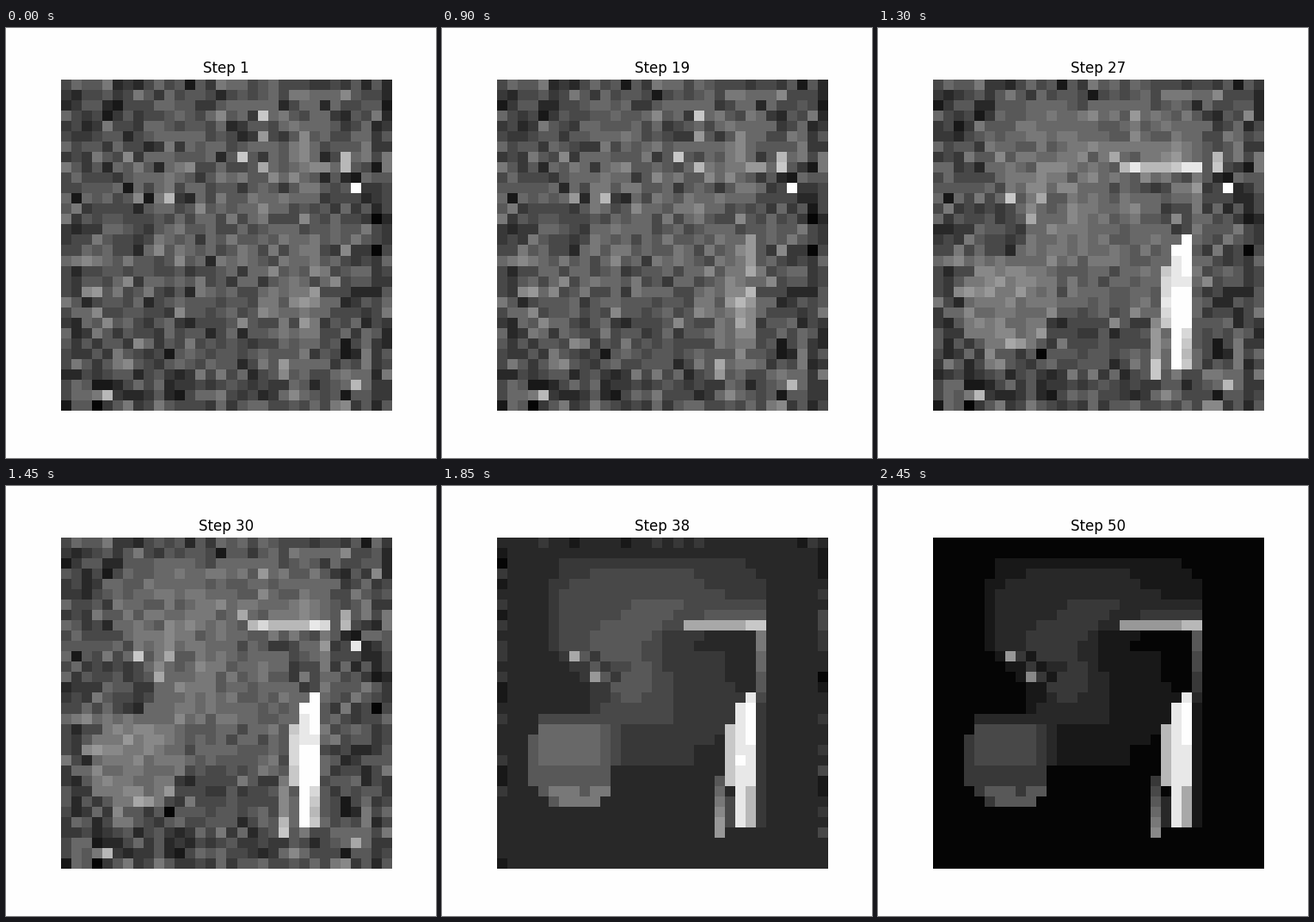
Animation of 500x500 px, one loop 2.5 s. Source, as a matplotlib script:

```python
import numpy as np
import matplotlib.pyplot as plt
from matplotlib.animation import FuncAnimation
from matplotlib.path import Path

SIZE = 32
STEPS = 50
SPARKS = [(17, 7), (27, 7), (27, 8), (28, 29), (4, 30), (10, 11), (19, 3)]

col, row = np.meshgrid(np.arange(SIZE), np.arange(SIZE))
centres = np.column_stack([col.ravel() + 0.5, row.ravel() + 0.5])


def blob(cx, cy, rx, ry):
    return np.exp(-((col - cx) / rx) ** 2 - ((row - cy) / ry) ** 2)


def ramp(step, start, end):
    """Smooth rise from 0 to 1 between two steps."""
    u = np.clip((step - start) / (end - start), 0, 1)
    return u * u * (3 - 2 * u)


def tone(level):
    """Grey value of one of 16 brightness levels."""
    return np.where(level == 0, 5, np.where(level == 15, 254, level * 16 + 8))


def draw_object():
    levels = np.zeros((SIZE, SIZE), int)

    def poly(level, *points):
        inside = Path(points).contains_points(centres).reshape(SIZE, SIZE)
        levels[inside] = level

    def box(level, x, y, w=1, h=1):
        levels[y:y + h, x:x + w] = level

    # Cloth, from the widest shade to the brightest fold
    poly(1, (6, 2), (23, 2), (26, 4), (26, 9), (22, 9), (22, 14), (24, 15),
         (22, 19), (19, 20), (19, 22), (12, 22), (9, 16), (9, 14), (5, 10), (5, 7))
    poly(2, (10, 3), (18, 3), (22, 5.5), (26, 6), (26, 7), (16, 9), (17, 18),
         (9, 18), (12, 14), (6, 11), (6, 5))
    poly(3, (14, 6), (18, 6), (18, 7), (14, 10), (15, 14), (13, 16), (11, 14),
         (14, 13), (9, 11), (9, 9.5))
    box(3, 20, 7, 6)
    poly(0, (21, 9), (24, 9), (24, 14), (22, 14), (22, 11), (19, 11), (19, 10))
    for i in range(3):
        box(3, 8 + i, 11 + i)
        box(1, 9 + i, 11 + i)
    box(9, 7, 11)
    box(8, 9, 13)

    # Bag
    box(2, 4, 17, 8, 5)
    poly(3, (4, 18), (11, 18), (11, 24), (10, 26), (5, 26), (3, 23), (3, 20))
    box(4, 4, 18, 6, 4)
    poly(5, (4, 24), (7, 24), (9, 25), (9, 24), (11, 24), (10, 26), (7, 26))

    # Handle and strap
    box(9, 18, 8, 6)
    box(11, 24, 8, 2)
    for y in range(9, 16):
        box(5 - (y - 9) // 2, 25, y)

    # Leg
    box(1, 25, 16, 1, 12)
    poly(11, (23, 17), (22, 19), (22, 24), (23, 24))
    poly(14, (24, 15), (25, 15), (25, 24), (24, 28), (23, 28), (23, 17))
    box(15, 24, 16, 1, 4)
    box(10, 24, 24, 1, 4)
    box(2, 22, 25, 1, 3)
    for y in range(23, 29):
        box(y - 20, 21, y)
    return np.where(levels > 0, tone(levels), 0)


def make_noise():
    rng = np.random.default_rng(12)
    noise, drift = np.clip(rng.normal(size=(2, SIZE, SIZE)), -3.2, 2.5)
    for c, r in SPARKS:
        noise[r, c] = 4.5
    noise[10, 28] = 9
    return noise, drift * 0.5


shape = draw_object()
noise, drift = make_noise()
centre = blob(15, 15, 12, 12)
glow = (14 * centre + 22 * blob(23, 20, 4, 6) + 18 * blob(21, 6, 5, 5)
        - 14 * (col > 29))
edge = np.where((col == 0) | (col == SIZE - 1), 1.0, 0.45 * (row == 0))


def mean_field(step):
    base = 74 - 68 * ramp(step, 33, 43)
    gain = 0.11 + 0.6 * ramp(step, 16, 28) + 0.29 * ramp(step, 32, 44)
    return base + gain * shape + glow * (1 - ramp(step, 19, 38))


def amplitude(step):
    calm = 1 - 0.45 * ramp(step, 16, 28) * (shape > 0)
    inner = calm * (1 - ramp(step, 28, 40))
    outer = 1 - ramp(step, 32, 44)
    return (26 - 7 * centre) * (inner + edge * (outer - inner))


def picture(step):
    limit = 9 - 6.6 * ramp(step, 28, 34)
    change = min(1, (step / 38) ** 3)
    grain = np.clip(noise + change * drift, -limit, limit)
    value = mean_field(step) + amplitude(step) * grain
    return tone(np.clip(value, 0, 255).astype(int) // 16)


fig, ax = plt.subplots(figsize=(5, 5), dpi=100, facecolor="#fefefe")
ax.axis("off")
image = ax.imshow(picture(1), cmap="gray", vmin=0, vmax=255,
                  interpolation="nearest")
title = ax.set_title("Step 1", fontsize=12, family="DejaVu Sans")


def update(i):
    image.set_data(picture(i + 1))
    title.set_text(f"Step {i + 1}")
    return image, title


anim = FuncAnimation(fig, update, frames=STEPS, interval=50,
                     repeat=True, repeat_delay=0, blit=False)
plt.show()
```
